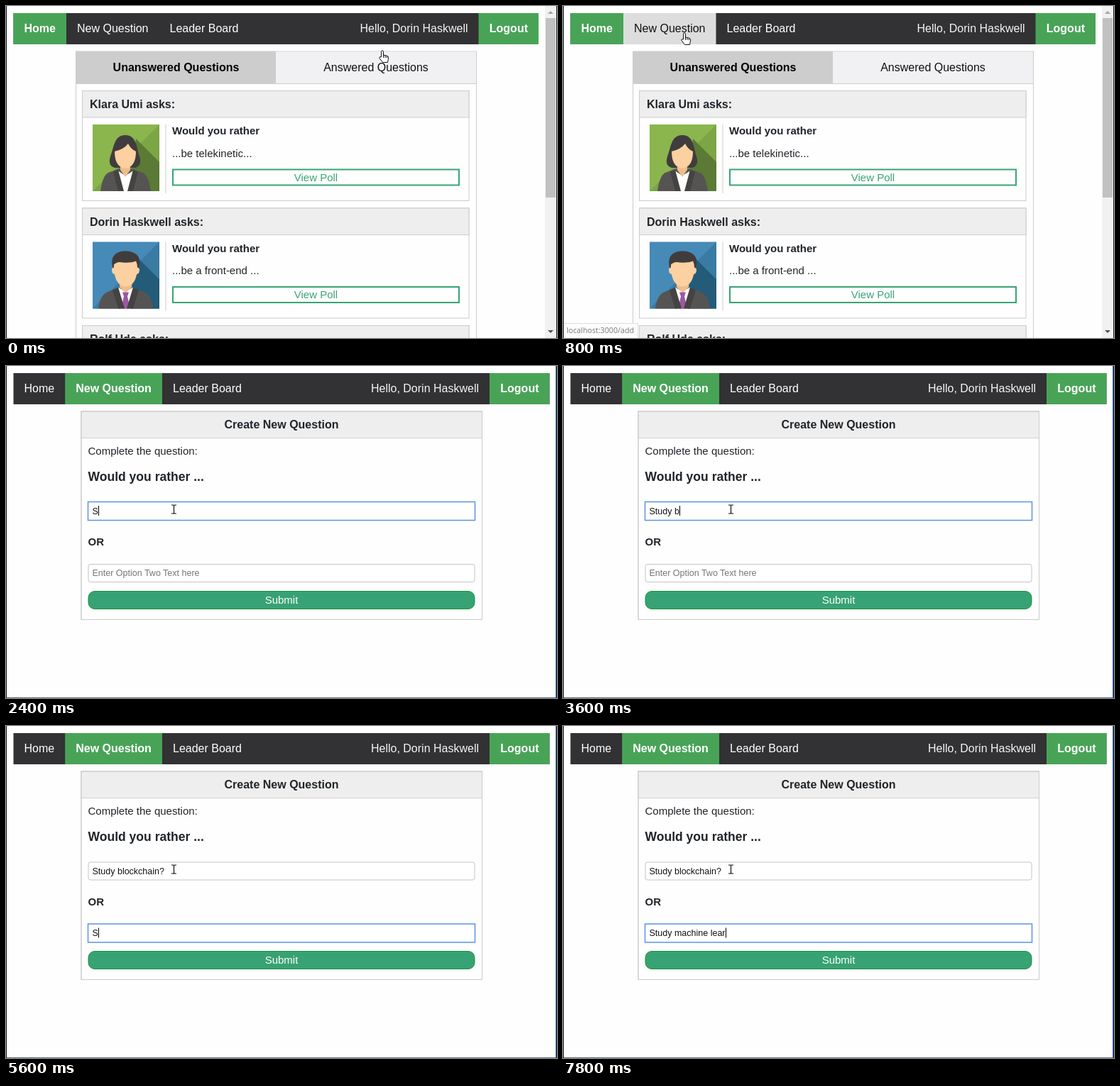
An HTML page for the animation above (8 s loop, 776 by 468 pixels).

```html
<!DOCTYPE html>
<html lang="en">
<head>
<meta charset="utf-8">
<title>Would you rather</title>
<style>
html, body { margin: 0; width: 100%; height: 100%; overflow: hidden; background: #fefefe; }
svg { display: block; width: 776px; height: 468px; }
text { font-family: "Liberation Sans", Arial, sans-serif; white-space: pre; }
.status { font-family: "Open Sans", "Noto Sans", sans-serif; }
</style>
</head>
<body>
<svg id="stage" viewBox="0 0 776 468"></svg>
<script>
const LOOP = 8000, STEP = 200;
const USER = 'Dorin Haskwell';
const GREEN = '#48a357', INK = '#212529', LINE = '#ccc';
const stage = document.getElementById('stage');

const rect = (x, y, w, h, fill, extra = '') =>
  `<rect x="${x}" y="${y}" width="${w}" height="${h}" fill="${fill}" ${extra}/>`;
const box = (x, y, w, h, fill = 'none', stroke = LINE, extra = '') =>
  rect(x, y, w, h, fill, `stroke="${stroke}" ${extra}`);
const path = (d, fill, extra = '') => `<path d="${d}" fill="${fill}" ${extra}/>`;
const text = (x, y, size, str, fill = INK, extra = '') =>
  `<text x="${x}" y="${y}" font-size="${size}" fill="${fill}" ${extra}>${str}</text>`;
const BOLD = 'font-weight="bold"', MID = 'text-anchor="middle"', END = 'text-anchor="end"';

// [time, value] pairs: the latest value already reached
const at = (keys, t, start) => keys.reduce((v, [k, n]) => t >= k ? n : v, start);

const first = 'Study blockchain?', second = 'Study machine learning?';
const firstKeys = [[2400, 1], [2600, 2], [2800, 4], [3000, 6], [3600, 7], [3800, 8],
  [4000, 9], [4200, 11], [4400, 13], [4600, 15], [4800, 16], [5000, 17]];
const secondKeys = [[5600, 1], [5800, 2], [6000, 3], [6400, 4], [6600, 6], [6800, 7],
  [7000, 9], [7200, 11], [7400, 13], [7600, 16], [7800, 18]];

// Pointer positions by time, with the shape shown there
const pointerKeys = [[0, [530, 63, 'hand']], [200, [446, 58, 'arrow']], [400, [332, 48, 'hand']],
  [600, [236, 42, 'hand']], [800, [171, 38, 'hand']], [1200, [177, 68, 'arrow']],
  [1400, [190, 108, 'arrow']], [1600, [222, 172, 'arrow']], [1800, [236.5, 202, 'beam']]];

const outline = 'stroke="#111" stroke-width="1" stroke-linejoin="round"';
const pointers = {
  hand: path('M-1.5 9V1.4a1.5 1.5 0 0 1 3 0V6l5 1.2q2.4.6 2.2 2.8L7.5 16.5H.5L-4 10.6q-.8-1.8 1-1.9Z', '#fff', outline) +
    path('M1.5 6v4M4 7v3M6.4 7.6v2.6', 'none', outline),
  arrow: path('M0 0V12.4L2.9 9.8L5 14.6L7 13.7L4.9 9H8.6Z', '#fff', outline),
  beam: path('M-3.5-6H-1Q0-6 0-5Q0-6 1-6H3.5M0-5V5M-3.5 6H-1Q0 6 0 5Q0 6 1 6H3.5', 'none', 'stroke="#111" stroke-width="1.2"')
};

function nav(right, active, hover) {
  const widths = active ? [72.7, 136.8, 127] : [74.5, 130.5, 127];
  let x = 10.5, out = rect(x, 10, right - x, 44, '#323133');
  ['Home', 'New Question', 'Leader Board'].forEach((label, i) => {
    const on = i === active, over = i === hover && !on;
    if (on || over) out += rect(x, 10, widths[i], 44, on ? GREEN : '#ddd');
    out += text(x + 15, 37, 16, label, over ? '#111' : '#fff', on ? BOLD : '');
    x += widths[i];
  });
  return out + text(right - 99.5, 37, 16, 'Hello, ' + USER, '#f4f4f4', END) +
    rect(right - 84.5, 10, 84.5, 44, GREEN) + text(right - 15, 37, 16, 'Logout', '#fff', BOLD + END);
}

function avatar(woman) {
  const [bg, mid, shade] = woman ? ['#8ab64d', '#7ca545', '#5a7a35'] : ['#468ab7', '#397ba3', '#245b78'];
  const hair = '#403c3d', skin = '#fcd0a0', suit = '#565453';
  const body = woman
    ? path('M46 15C30 15 30 33 25 45Q21 58 31 61H60Q70 58 66 45C62 33 62 15 46 15Z', hair) +
      path('M11 94Q14 72 22 68L38 62H54L71 68Q79 72 82 94Z', suit) +
      path('M35 65L46 72L58 65L55 94H38Z', '#fff') +
      path('M39 52H53V64L46 74L39 64Z', '#efbd8b') +
      path('M31 38Q44 35 50 27Q54 35 61 38Q61 60 46 62Q31 60 31 38Z', skin) +
      path('M36 64L44 94H36L29 67ZM57 64L49 94H57L64 67Z', '#454342')
    : path('M8 94Q10 76 20 71L37 64H56L73 71Q83 76 85 94Z', suit) +
      path('M36 64L46 70L57 64L54 94H39Z', '#fff') +
      path('M38 52H55V64L46.500 72L38 64Z', '#efbd8b') +
      path('M29 39C23 20 33 13 46 13C60 13 71 20 64 39Z', hair) +
      path('M30 32Q35 27 42 29Q54 30 61 27Q63 31 63 36Q68 37 65 44L62 46Q59 62 46.500 63Q34 62 31 46L28 44Q25 37 30 36Z', skin) +
      path('M42 71H51L49 77L53 94H40L44 77Z', '#9b58a3') +
      path('M36 64L45 94H36L28 68ZM57 64L48 94H57L65 68Z', '#454342');
  return rect(0, 0, 94, 94, bg) + path('M94 0V94H0Z', mid) + path('M61 20L94 53V94H52Z', shade) + body;
}

function card(y, name, question, woman) {
  return `<g transform="translate(0 ${y})">` +
    box(107.5, 0, 544.5, 155, '#fefefe') + box(107.5, 0, 544.5, 37.5, '#eee') +
    text(118, 24.5, 16, name + ' asks:', INK, BOLD) +
    `<g transform="translate(122 47.500)">${avatar(woman)}</g>` +
    rect(224.5, 47.5, 1, 97, LINE) +
    text(234, 61.5, 15, 'Would you rather', INK, BOLD) + text(234, 93, 15, question) +
    box(235, 111, 403, 22, '#fff', '#38a474', 'stroke-width="2"') +
    text(436.5, 127, 15, 'View Poll', '#38a474', MID) + '</g>';
}

function scrollbar() {
  return rect(759, 0, 16, 468, '#f1f1f1') + rect(760, 17, 14, 253, '#c1c1c1') +
    path('M763 11L767 7L771 11Z', '#a3a3a3') + path('M763 457L767 461L771 457Z', '#505050');
}

function listPage(hover) {
  return nav(750, 0, hover) +
    box(98.5, 64, 564, 420) + rect(98.5, 64, 281.5, 45, '#cdcdcd') + rect(380, 64.5, 282, 45, '#f1f1f4') +
    rect(98.5, 109, 564, 1, LINE) +
    text(239.5, 92, 16, 'Unanswered Questions', '#000', BOLD + MID) +
    text(521, 92, 16, 'Answered Questions', '#111', MID) +
    card(119.5, 'Klara Umi', '...be telekinetic...', true) +
    card(285, USER, '...be a front-end ...', false) +
    card(450.5, 'Rolf Uda', '', false) + scrollbar();
}

function field(y, value, hint, focused, caret) {
  const frame = focused
    ? box(115.5, y - .5, 545, 26, '#fff', '#5b93e8', 'stroke-width="1.500"')
    : box(116, y, 544, 25, '#fff', '#c4c4c4', 'rx="3"');
  return frame + text(121.5, y + 16.5, 12.5, value || hint, value ? '#111' : '#757575', caret ? 'id="typed"' : '') +
    (caret ? rect(121, y + 5, 1, 14, '#000', 'id="caret"') : '');
}

function formPage(t) {
  const one = first.slice(0, at(firstKeys, t, 0)), two = second.slice(0, at(secondKeys, t, 0));
  const focus = at([[2200, 1], [5200, 2]], t, 0), lit = t !== 6200;
  return nav(765.5, 1) +
    box(106, 64, 564.5, 293.5, '#fefefe') + box(106, 64, 564.5, 37.5, '#eee', '#d2d2d2') + box(106, 64, 564.5, 293.5) +
    text(388, 88, 16, 'Create New Question', INK, BOLD + MID) +
    text(115.5, 125, 15, 'Complete the question:') +
    text(115.5, 162, 17.55, 'Would you rather ...', INK, BOLD) +
    field(192, one, 'Enter Option One Text here', focus === 1, focus === 1 && lit) +
    text(115.5, 253, 15, 'OR', INK, BOLD) +
    field(279.5, two, 'Enter Option Two Text here', focus === 2, focus === 2 && lit) +
    box(116, 317.5, 544, 25, '#37a274', '#1b933f', 'rx="9"') +
    text(388, 335, 15, 'Submit', '#fff', MID) +
    rect(0, 467, 776, 1, '#66727e') + rect(774, 0, 1, 468, '#2a6cb5');
}

function status(page) {
  const w = page === 'add' ? 105 : 147;
  return box(.5, 447.5, w, 21, '#fdfdfd', '#ddd') +
    text(5, 461, 10.7, 'localhost:3000/' + page, '#777', 'class="status"');
}

function draw(t) {
  const [x, y, shape] = at(pointerKeys, t);
  const list = t < 1200;
  const hover = y > 54 ? -1 : x < 215 ? 1 : x < 342 ? 2 : -1;
  let out = list ? listPage(hover) : formPage(t);
  if (list ? hover > 0 : t < 1600) out += status(list && hover === 2 ? 'leaderboard' : 'add');
  out += rect(0, 0, 1, 468, '#111') + rect(775, 0, 1, 468, '#222');
  stage.innerHTML = out + `<g transform="translate(${x} ${y})">${pointers[shape]}</g>`;

  const typed = document.getElementById('typed');
  if (typed && typed.getAttribute('fill') === '#111')
    document.getElementById('caret').setAttribute('x', Math.round(121.5 + typed.getComputedTextLength()));
}

let shown = -1;
const start = performance.now();
function tick() {
  const t = Math.floor((performance.now() - start) % LOOP / STEP) * STEP;
  if (t !== shown) draw(shown = t);
  requestAnimationFrame(tick);
}
tick();
</script>
</body>
</html>
```
